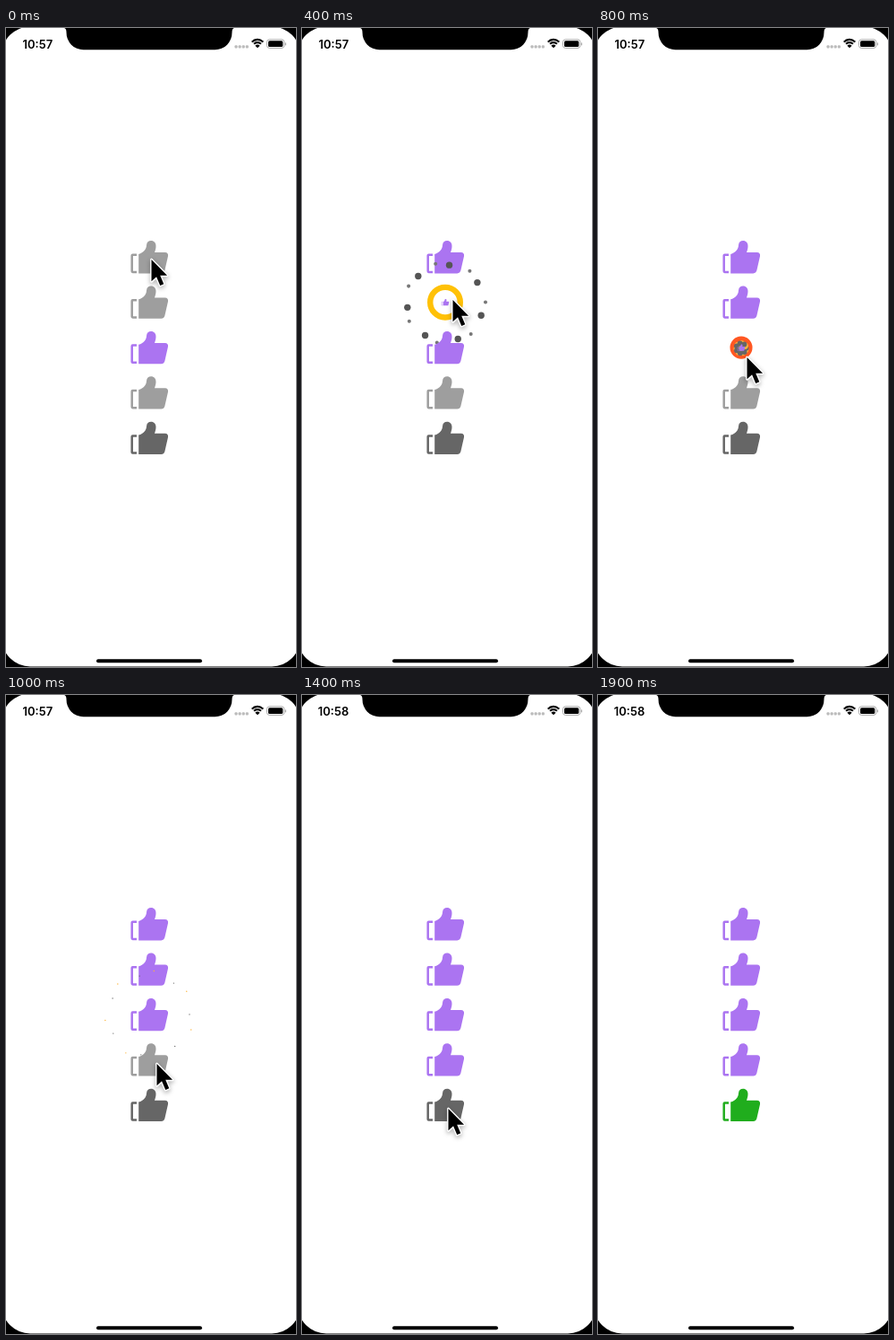
These frames come from a looping animation (324 px wide and 712 px high, 2 s). An HTML page with a canvas:

```html
<!DOCTYPE html>
<html lang="en">
<head>
<meta charset="utf-8">
<title>Like buttons</title>
<style>
  html, body { margin: 0; width: 100%; height: 100%; overflow: hidden; background: #000; }
  canvas { display: block; width: 100%; height: 100%; }
</style>
</head>
<body>
<canvas></canvas>
<script>
const W = 324, H = 712, LOOP = 2000, STEP = 100;
const canvas = document.querySelector('canvas');
const ctx = canvas.getContext('2d');
const ratio = window.devicePixelRatio || 1;
canvas.width = W * ratio;
canvas.height = H * ratio;

const GREY = '#9e9e9e', PURPLE = '#ab74f1', AMBER = '#fdb53c';
const LIKE_TIME = 300;
const BURST = 49.5;

const buttons = [
  { start: 80, off: GREY, on: PURPLE, outer: '#555', inner: '#777' },
  { start: 301, off: GREY, on: PURPLE, outer: '#555', inner: '#777' },
  { start: 765, off: GREY, on: PURPLE, outer: AMBER, inner: '#666', unlikeAt: 700 },
  { start: 1080, off: GREY, on: PURPLE, outer: AMBER, inner: '#888' },
  { start: 1400, off: '#666', on: '#20ad1d', outer: AMBER, inner: '#888' },
];

// Pointer stops: time, x, y
const pointerStops = [
  [0, 162, 257], [100, 162, 257], [300, 168, 302], [400, 168, 302], [600, 166, 366],
  [800, 166, 366], [1000, 168, 410], [1200, 168, 410], [1400, 163, 460], [1600, 166, 460], [1700, 166, 460],
];

const thumb = new Path2D(`M9 14.8C14.5 13.5 17.6 9.5 17.8 5C18 1.8 20 0 22.8 0
  C26.3 0 28.3 2.5 28.3 5.8C28.3 8.5 27.6 10.8 26.8 13H38.5
  C41 13 42.3 14.8 41.8 17.2L38.2 33C37.7 35 36.3 36.3 34.2 36.3H9Z`);
const cuff = new Path2D('M6.8 15.7H2.3Q1.5 15.7 1.5 16.5V34Q1.5 34.9 2.3 34.9H6.8');
const arrow = new Path2D('M0 0V28L6.4 22L11.2 33.3L15.8 31.3L11.2 20.4H20.2Z');
const notch = new Path2D('M65 0Q67.5 .5 67.5 5A19 19 0 0 0 86.5 24.3H233.5A19 19 0 0 0 252.5 5Q252.5 .5 255 0Z');

const clamp = x => Math.min(1, Math.max(0, x));
const span = (x, a, b) => clamp((x - a) / (b - a));
const mix = (a, b, x) => a + (b - a) * x;
const easeOut = x => 1 - (1 - x) ** 2;
const overshoot = x => { const u = x - 1; return u * u * (3.5 * u + 2.5) + 1; };

function box(x, y, w, h, r, color) {
  ctx.fillStyle = color;
  ctx.beginPath();
  ctx.roundRect(x, y, w, h, r);
  ctx.fill();
}

function dot(x, y, r, color) {
  if (r <= 0) return;
  ctx.fillStyle = color;
  ctx.beginPath();
  ctx.arc(x, y, r, 0, 7);
  ctx.fill();
}

function drawRing(x, y, p) {
  const outer = 20 * easeOut(span(p, 0, .3));
  const hole = 20 * easeOut(span(p, .2, .5));
  if (outer <= hole) return;
  const k = span(p, .15, .3);
  ctx.strokeStyle = `rgb(255 ${mix(87, 193, k)} ${mix(34, 7, k)})`;
  ctx.lineWidth = outer - hole;
  ctx.beginPath();
  ctx.arc(x, y, (outer + hole) / 2, 0, 7);
  ctx.stroke();
}

function drawBurst(x, y, p, button) {
  const q = easeOut(span(p, .1, 1));
  if (!q) return;
  const outerR = BURST * (q < .3 ? .8 * q / .3 : mix(.8, 1, span(q, .3, .8)));
  const innerR = 45 * span(q, 0, .3);
  const outerSize = 3.7 * (1 - span(q, .7, 1));
  const innerSize = q < .5 ? mix(3, 1.8, span(q, .2, .5)) : mix(1.8, .5, span(q, .5, 1));
  for (let i = 0; i < 7; i++) {
    const a = (19 + i * 360 / 7) * Math.PI / 180, b = a - .35;
    dot(x + outerR * Math.cos(a), y + outerR * Math.sin(a), outerSize, button.outer);
    dot(x + innerR * Math.cos(b), y + innerR * Math.sin(b), innerSize, button.inner);
  }
}

function drawButton(button, index, t) {
  const x = 160, y = 255.3 + index * 50.4;
  const p = (t - button.start) / LIKE_TIME;
  const active = p > 0 && p < 1;
  const liked = p > 0 || t < button.unlikeAt;
  if (active) {
    drawRing(x, y, p);
    drawBurst(x, y + .7, p, button);
  }
  const scale = active ? mix(.2, 1, overshoot(span(p, .35, .66))) : 1;
  ctx.save();
  ctx.translate(x, y);
  ctx.scale(scale, scale);
  ctx.translate(-20.8, -18.2);
  ctx.fillStyle = ctx.strokeStyle = liked ? button.on : button.off;
  ctx.lineWidth = 2.5;
  ctx.stroke(cuff);
  ctx.fill(thumb);
  ctx.restore();
}

function drawStatusBar(t) {
  ctx.fillStyle = '#000';
  ctx.fill(notch);
  ctx.font = '600 13px Inter, sans-serif';
  ctx.fillText(t < 1300 ? '10:57' : '10:58', t < 1300 ? 18.5 : 17.8, 22.5);

  for (let i = 0; i < 4; i++) box(255.5 + i * 4.1, 19.3, 3.1, 3.1, 1, '#bbb');

  ctx.strokeStyle = '#000';
  ctx.lineWidth = 2.1;
  for (const r of [8.6, 5.4]) {
    ctx.beginPath();
    ctx.arc(281, 21.5, r, -Math.PI * .76, -Math.PI * .24);
    ctx.stroke();
  }
  ctx.fillStyle = '#000';
  ctx.beginPath();
  ctx.moveTo(281, 22.3);
  ctx.arc(281, 22.3, 3.7, -Math.PI * .75, -Math.PI * .25);
  ctx.fill();

  ctx.strokeStyle = '#aaa';
  ctx.lineWidth = 1;
  ctx.beginPath();
  ctx.roundRect(291.5, 12.8, 19.3, 9.6, 2.8);
  ctx.stroke();
  box(293, 14.2, 16.3, 6.8, 1.5, '#000');
  box(311.8, 16.2, 1.2, 3.2, .6, '#aaa');
}

function drawPointer(t) {
  const next = pointerStops.findIndex(stop => stop[0] >= t);
  if (next < 0) return;
  const b = pointerStops[next], a = pointerStops[Math.max(0, next - 1)];
  const k = span(t, a[0], b[0] || 1);
  ctx.save();
  ctx.translate(mix(a[1], b[1], k) + .5, mix(a[2], b[2], k) + 1);
  ctx.scale(.87, .87);
  ctx.lineJoin = 'round';
  ctx.lineWidth = 3.2;
  ctx.strokeStyle = '#fff';
  ctx.shadowColor = 'rgba(0, 0, 0, .35)';
  ctx.shadowBlur = 5 * ratio;
  ctx.shadowOffsetY = 2 * ratio;
  ctx.stroke(arrow);
  ctx.shadowColor = 'transparent';
  ctx.fillStyle = '#000';
  ctx.fill(arrow);
  ctx.restore();
}

function draw(t) {
  ctx.setTransform(ratio, 0, 0, ratio, 0, 0);
  ctx.fillStyle = '#000';
  ctx.fillRect(0, 0, W, H);
  box(-5, -1.5, 334, 712.9, 32, '#fff');
  drawStatusBar(t);
  box(101, 703.2, 118, 4, 2, '#000');
  buttons.forEach((button, i) => drawButton(button, i, t));
  drawPointer(t);
}

const origin = performance.now();
function frame() {
  const t = (performance.now() - origin) % LOOP;
  draw(Math.floor(t / STEP) * STEP);
  requestAnimationFrame(frame);
}
frame();
</script>
</body>
</html>
```
